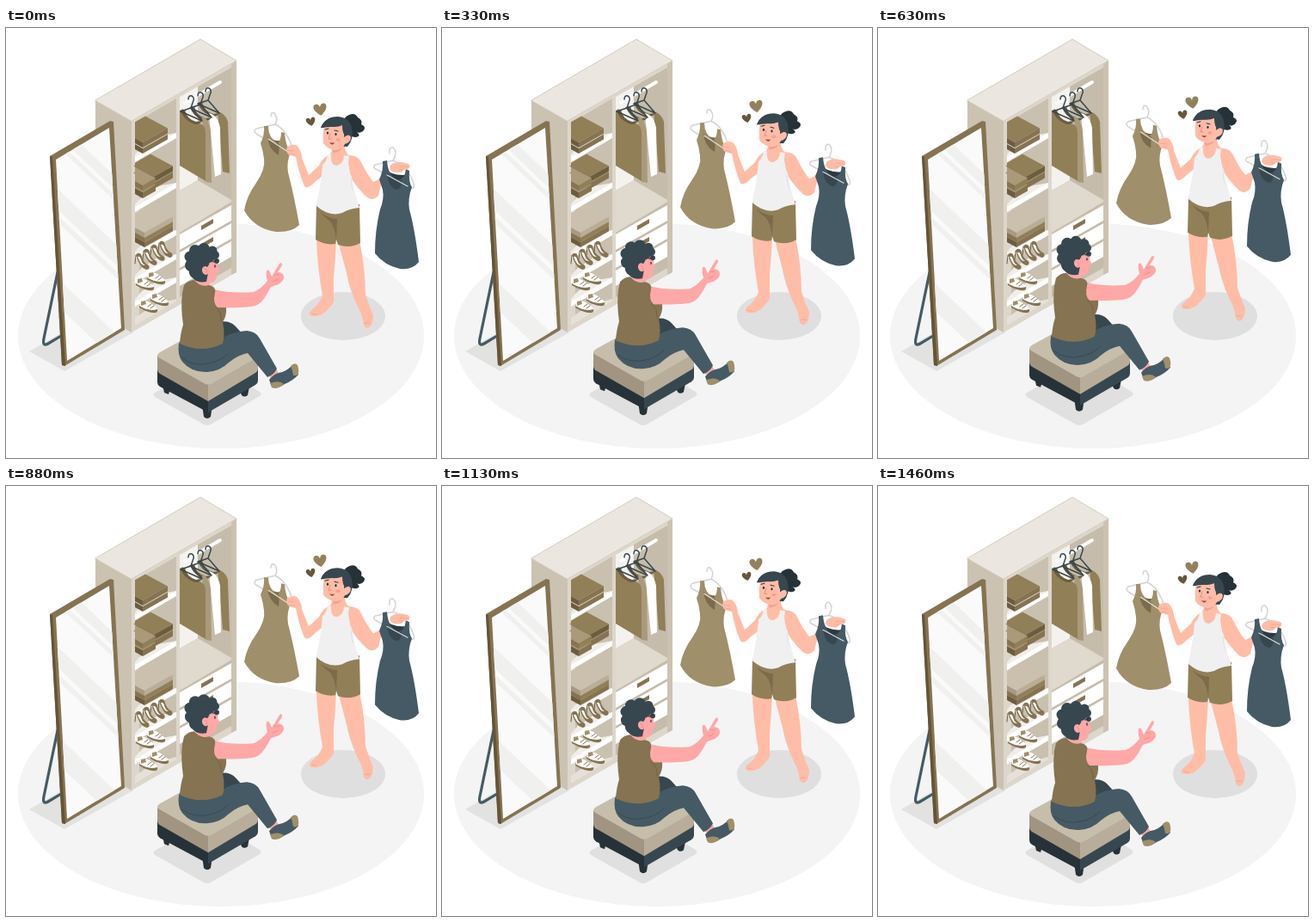
These frames come from a looping animation (500 by 500 pixels, 1.5 s). An HTML page with a canvas:

```html
<!DOCTYPE html>
<html lang="en">
<head>
<meta charset="utf-8">
<title>Choosing a dress</title>
<style>
  html, body { margin: 0; width: 100%; height: 100%; overflow: hidden; background: #fff; }
  canvas { display: block; width: 500px; height: 500px; }
</style>
</head>
<body>
<canvas id="stage" width="500" height="500"></canvas>
<script>
const ctx = document.getElementById('stage').getContext('2d');
const LOOP = 1500, FRAMES = 36, LIFT = 8.6;
const BROWN = '#857352', OLIVE = '#917f58', TAN = '#a08f6b', DEEP = '#6c5c40', SLATE = '#455a64',
      NIGHT = '#263238', INK = '#37474f', SKIN = '#ffbda7', PINK = '#ffa8a7';

const paths = new Map();
function path(d) {
  if (!paths.has(d)) paths.set(d, new Path2D(d));
  return paths.get(d);
}
function fill(color, d) {
  ctx.fillStyle = color;
  ctx.fill(path(d));
}
function line(color, width, d) {
  ctx.strokeStyle = color;
  ctx.lineWidth = width;
  ctx.stroke(path(d));
}
function oval(color, x, y, rx, ry = rx, turn = 0) {
  ctx.fillStyle = color;
  ctx.beginPath();
  ctx.ellipse(x, y, rx, ry, turn, 0, Math.PI * 2);
  ctx.fill();
}
function at(x, y, turn, size, draw) {
  ctx.save();
  ctx.translate(x, y);
  ctx.rotate(turn);
  ctx.scale(size, size);
  draw();
  ctx.restore();
}

function floor() {
  ctx.fillStyle = '#fff';
  ctx.fillRect(0, 0, 500, 500);
  oval('#f4f4f4', 250, 358, 236, 131);
  fill('#e2e2e1', 'M27 376L60 357L104 330L148 354L68 399Z');
  fill('#e0e0e0', 'M173 424L233 391Q237 389 241 391L295 423Q298 426 295 428L238 461Q234 463 230 461L173 429Q170 426 173 424Z');
  oval('#dfdfdf', 392, 335, 49, 28);
}

function shelf(y) {
  fill('#f1eee9', `M150 ${y - 5}L158 ${y - 14}L176 ${y - 26}L198 ${y - 30}V${y - 28}L150 ${y}Z`);
  fill('#fff', `M150 ${y - 2}L198 ${y - 30}V${y - 24}L150 ${y + 4}Z`);
}

// Folded cloth with its front corner at x, y; the shelf wall cuts it off at the left.
function fold(x, y, w, h, top, side, edge) {
  const slope = 0.57, wall = 150;
  const right = x + w, rightY = y - w * slope;
  const back = right - 26, backY = rightY - 14;
  const frontWall = y - (x - wall) * 0.55, backWall = backY + (back - wall) * slope;
  fill(edge, `M${wall} ${frontWall}L${x} ${y}V${y + h}L${wall} ${frontWall + h}Z`);
  fill(side, `M${x} ${y}L${right} ${rightY}V${rightY + h}L${x} ${y + h}Z`);
  fill(top, `M${wall} ${frontWall}L${x} ${y}L${right} ${rightY}L${back} ${backY}L${wall} ${backWall}Z`);
}

function heel(x, y) {
  at(x, y, 0, 1, () => {
    fill(BROWN, 'M-6 -11Q-4 -15 0 -12Q2 -2 9 1Q11 5 7 6Q-1 5 -6 -11Z');
    fill('#fff', 'M-4 -9Q-1 -10 0 -6Q1 -1 5 1Q0 2 -4 -9Z');
    line(DEEP, 1, 'M-6 -11L-7 -1');
  });
}
function sneaker(x, y) {
  at(x, y, 0, 1, () => {
    fill('#fff', 'M-9 -5Q-3 -8 1 -5L9 1Q12 5 8 6Q0 7 -11 0Z');
    fill(BROWN, 'M-11 -1Q0 6 10 3Q11 6 8 7Q0 8 -11 1Z');
    fill(TAN, 'M-9 -6L-4 -7L-3 -3L-9 -1Z');
    line(BROWN, 1, 'M-1 0L3 -3M2 2L6 -1');
  });
}

function shelves() {
  fill('#c9c0b0', 'M150 110L198 82V318L150 346Z');
  fill('#ddd6ca', 'M150 110L155 107V343L150 346Z');
  [152, 210, 265, 293, 320].forEach(shelf);
  fill('#e6e1d8', 'M150 337L172 322L198 315V318L150 346Z');

  fold(159, 140, 29, 6, '#cdc2af', BROWN, DEEP);
  fold(159, 133, 29, 6, OLIVE, BROWN, DEEP);
  fold(172, 180, 22, 7, TAN, BROWN, DEEP);
  fold(172, 173, 22, 6, OLIVE, DEEP, DEEP);
  fold(159, 191, 15, 7, TAN, BROWN, DEEP);
  fold(159, 183, 15, 6, '#aa9a7a', OLIVE, BROWN);
  fold(161, 249, 33, 6, TAN, BROWN, DEEP);
  fold(161, 243, 33, 6, '#b3a387', OLIVE, BROWN);
  fold(161, 238, 33, 6, '#cbc0ad', '#b9ad97', '#a89a82');

  [[157, 275], [166, 270], [175, 265], [184, 261]].forEach(([x, y]) => heel(x, y));
  [[162, 298], [175, 291], [166, 324], [179, 316]].forEach(([x, y]) => sneaker(x, y));
}

function railHanger(x, y) {
  at(x, y, 0, 1, () => {
    fill(DEEP, 'M-12 12Q-9 22 2 27Q9 30 13 24L6 25Q-5 22 -7 11Z');
    line(INK, 1.5, 'M-3 -1Q-3 -6 1 -5Q5 -3 2 3L0 9L-12 13M0 9L13 24L-12 13');
  });
}

function drawer(y, h) {
  fill('#fff', `M202 ${y}L262 ${y - 34}V${y - 34 + h}L202 ${y + h}Z`);
  fill(BROWN, `M227 ${y - 10}L241 ${y - 18}V${y - 13}L227 ${y - 5}Z`);
}

function hangingSide() {
  fill('#c6bcab', 'M202 80L262 46V279L202 313Z');
  fill('#f4f2ef', 'M202 80L223 68V177L202 189Z');
  fill('#e0d9ce', 'M202 189L223 177L264 201L202 238Z');
  line('#fff', 4, 'M208 87L249 63');

  fill(OLIVE, 'M246 97Q255 99 258 109L260 169L252 167L248 120Z');
  railHanger(235, 75);
  fill('#fff', 'M236 99Q246 101 249 116L250 170L243 173L238 121Z');
  railHanger(226, 80);
  fill('#a99a7b', 'M228 102Q236 106 238 120L239 180L232 179Z');
  fill(OLIVE, 'M202 96L206 94Q210 110 225 111Q232 113 232 122V178L202 160Z');
  railHanger(215, 84);

  drawer(240, 18);
  drawer(261, 18);
  drawer(282, 18);
}

function wardrobe() {
  fill('#cbc2b2', 'M104 84L146 108V354L104 330Z');
  fill('#ebe7e0', 'M104 84L226 13L268 38L146 108Z');
  fill('#ddd6ca', 'M146 108L268 38V284L146 354Z');
  shelves();
  hangingSide();
  fill('#ddd6ca', 'M198 79L202 77V316L198 318Z');
  fill('#cbc2b2', 'M262 42L268 38V284L262 287Z');
  line('#d4ccbf', 1, 'M104 84L226 13L268 38L146 108Z');
}

function mirror() {
  line(SLATE, 3.2, 'M60 284L44 361Q42 371 49 367L64 358');
  fill(BROWN, 'M51 149L121 108L125 109L138 351L68 393L65 392Z');
  fill('#645438', 'M51 149L54 150L69 393L65 392Z');
  const glass = 'M58 153L120 116L134 349L71 387Z';
  fill('#fafafa', glass);
  ctx.save();
  ctx.clip(path(glass));
  for (const [y, h] of [[107, 16], [129, 7], [185, 24], [216, 8], [289, 32]]) {
    fill('#f0f0ee', `M58 ${y}L138 ${y + 76}V${y + 76 + h}L58 ${y + h}Z`);
  }
  ctx.restore();
}

function stool() {
  fill(NIGHT, 'M181 410L192 416L189 426L184 424ZM228 438L240 438L238 452Q234 456 230 452ZM271 420L284 412L281 427Q277 430 274 427Z');
  fill(NIGHT, 'M176 394L235 426V447L179 417Q176 415 176 412Z');
  fill(INK, 'M235 426L293 393V410Q293 413 290 415L235 447Z');
  fill('#a19582', 'M176 381L235 414V434L179 402Q176 400 176 396Z');
  fill('#b8ad9a', 'M235 414L293 381V395Q293 399 290 401L235 434Z');
  fill('#c7bdab', 'M179 377L230 349Q235 346 240 349L290 377Q296 381 290 384L240 413Q235 416 230 413L179 384Q173 381 179 377Z');
}

function sitter() {
  stool();
  fill(INK, 'M246 342Q260 339 267 347L276 357L272 372H248Z');
  fill(PINK, 'M303 401L313 394L317 402L309 409Z');
  fill(SLATE, 'M306 409Q312 402 317 401Q326 400 334 391L340 403Q334 410 324 414Q318 419 309 417Z');
  fill(TAN, 'M331 393Q336 388 339 392Q342 401 338 404L334 404Q333 397 331 393ZM307 413Q318 409 323 414Q316 421 309 418Z');
  fill(SLATE, 'M203 363Q225 368 249 362Q263 353 280 352Q291 353 295 361L315 396Q312 403 304 406L281 378Q270 380 259 389Q249 399 234 400Q216 401 205 388Q199 380 201 367Z');
  line('#394b54', 1, 'M205 384Q218 394 236 390Q248 388 258 379');

  fill(PINK, 'M219 286L240 283L236 302L222 303Z');
  fill(PINK, 'M242 304Q261 309 288 307Q297 303 304 294Q302 287 303 282Q306 280 308 287L309 289L318 274Q321 271 321 276L316 284Q322 284 323 289Q324 293 317 298L308 301Q299 319 292 322Q284 326 244 325Q238 315 242 304Z');
  line('#f48684', 0.8, 'M312 287L317 287M310 295L316 292');
  fill(BROWN, 'M207 299Q212 293 219 293Q226 302 236 299Q245 301 243 308Q240 320 246 325L256 325Q257 334 252 342Q255 356 252 367Q228 379 202 367Q203 354 206 345Q203 325 205 308Z');
  line('#6e5f42', 0.8, 'M244 325Q251 330 250 341');

  fill(PINK, 'M230 270L244 265Q247 274 246 278L249 283L245 285Q246 294 239 296L228 295Z');
  const curls = [[214, 266, 6.5], [220, 259, 7], [230, 257, 7], [240, 259, 5.5], [243, 264, 5],
                 [245, 271, 3], [215, 276, 7], [225, 270, 12], [220, 284, 7], [236, 266, 7], [225, 288, 6.5]];
  for (const [x, y, r] of curls) oval(INK, x, y, r);
  fill(INK, 'M212 281Q217 298 233 295L235 285L227 276Z');
  oval(PINK, 232, 282, 4, 5, -0.3);
  line('#f48684', 0.9, 'M231 280Q235 281 233 285');
  line(NIGHT, 1.3, 'M241 272L245 270M243 276L243 278');
}

function heart(x, y, size, turn, color) {
  at(x, y, turn, size, () => fill(color, 'M0 7C-10 0 -9 -7 -4 -7Q-1 -7 0 -3Q1 -7 4 -7C9 -7 10 0 0 7Z'));
}

function oliveDress() {
  line('#d3d3d3', 1.5, 'M308 103Q308 97 312 99Q317 105 313 112L291 117Q287 120 291 123L331 147Q336 149 334 144Q328 119 313 112');
  fill('#6f6043', 'M303 124Q311 133 323 131L325 149L303 136Z');
  fill(TAN, 'M300 114L305 114Q305 128 316 134Q320 130 320 121L324 122Q325 137 331 144Q326 156 328 168Q335 195 341 229Q332 238 314 237Q288 233 277 212Q280 195 291 180Q302 164 300 152Q299 143 296 134Q301 124 300 114Z');
  fill('#7b6b4a', 'M304 126Q305 141 317 148L318 135Q307 132 304 126Z');
  line('#e3e0da', 1.3, 'M305 129L331 146');
}

function slateDress() {
  line('#d3d3d3', 1.5, 'M446 146Q445 138 450 139Q456 144 450 154L429 159Q426 162 430 164L470 186Q476 187 474 181Q467 160 450 154');
  fill('#2c3a41', 'M441 163Q448 172 464 171L462 188L444 177Z');
  fill(SLATE, 'M438 155L443 154Q444 171 455 177Q464 176 465 164L469 166Q468 179 472 185Q467 198 469 211Q475 232 480 272Q472 282 458 280Q440 276 429 262Q429 235 435 211Q440 199 438 188L434 176Q439 166 438 155Z');
  fill(INK, 'M443 168Q444 186 455 188Q460 187 460 177Q448 178 443 168Z');
  line('#dcdcdc', 1.2, 'M443 171L467 184');
}

function shopper() {
  heart(365.5, 95, 0.98, -0.15, '#93815c');
  heart(354.5, 109, 0.7, -0.2, '#65563c');
  oliveDress();

  fill(SKIN, 'M361 247H384Q383 270 381 290L381 313Q383 319 376 325Q368 336 357 335Q350 334 355 328Q364 322 368 311Q362 278 361 247ZM386 247H411Q418 281 418 310Q421 320 427 334Q427 346 421 349Q415 349 415 339Q413 330 408 322Q399 302 396 285Z');
  line('#f5a38e', 0.8, 'M356 332L361 333M417 343L423 343');
  fill(SKIN, 'M376 147Q368 151 364 160L352 171L344 151Q344 145 340 139Q336 133 327 138Q325 142 328 147L337 150Q341 170 347 184Q351 188 359 179L372 169Z');
  fill(SKIN, 'M396 148Q409 147 413 156Q419 169 427 179L438 174Q435 187 433 195Q426 202 420 197Q409 187 401 174Z');

  fill(OLIVE, 'M361 205H411L412 250Q400 257 386 252L384 246L383 251Q371 253 360 246Z');
  fill('#7b6b4a', 'M365 214Q377 222 385 222L384 247Q382 226 372 221Z');
  fill(SKIN, 'M379 135L394 133Q393 145 400 149L391 161L378 160L374 148Q380 147 379 135Z');
  fill('#f5a38e', 'M380 139L391 140Q386 146 380 145Z');
  fill('#f0f0f0', 'M374 147L378 147Q377 160 385 160Q393 157 393 148L399 149Q396 163 402 173Q404 188 411 209Q399 210 391 215Q376 220 361 207Q361 203 364 190Q367 173 368 159Q373 155 374 147Z');
  line('#dfdfdf', 0.8, 'M402 174Q400 182 404 190');

  // Hair, face and bun
  fill(NIGHT, 'M395 110Q391 104 399 101Q406 98 409 104Q415 107 413 112Q420 115 415 120Q411 123 408 121Q414 126 406 127Q398 126 397 119Z');
  fill(INK, 'M366 116Q371 103 386 103Q399 104 402 116Q405 129 397 138L384 137L375 116Z');
  fill(SKIN, 'M370 113Q383 117 391 113Q394 119 393 127Q399 122 401 127Q401 133 394 135Q391 142 382 142Q373 140 369 134Q368 124 370 113Z');
  fill(INK, 'M366 116Q369 107 381 105Q394 104 397 117L395 126Q391 123 391 113Q380 115 366 116Z');
  oval(NIGHT, 374, 122, 1.1, 1.6);
  oval(NIGHT, 383.5, 123.5, 1.1, 1.6);
  line(NIGHT, 1, 'M371 118L375 117M382 119L386 120');
  line('#ee8b78', 1, 'M377 123L375 129L378 129');
  oval('#ff9d8d', 386, 130, 2.6, 1.9);
  fill('#9e4038', 'M376 133Q380 134 382 133Q380 138 376 133Z');

  slateDress();
  fill(SKIN, 'M447 160Q453 154 464 157Q471 158 469 162Q468 165 462 165Q460 169 455 168Q447 168 446 163Z');
  line('#f5a38e', 0.8, 'M458 161Q463 160 468 162M457 165L462 165');
  line('#f5a38e', 0.8, 'M328 142L334 143M330 146L336 147');
}

function draw(now) {
  const step = Math.floor((now % LOOP + 3.5) / LOOP * FRAMES) % FRAMES;
  const rise = (1 - Math.cos(step / (FRAMES - 1) * Math.PI * 2)) / 2;
  floor();
  wardrobe();
  mirror();
  ctx.save();
  ctx.translate(0, -LIFT * rise);
  shopper();
  sitter();
  ctx.restore();
}

ctx.lineCap = ctx.lineJoin = 'round';
const start = performance.now();
function tick() {
  draw(performance.now() - start);
  requestAnimationFrame(tick);
}
tick();
</script>
</body>
</html>
```
